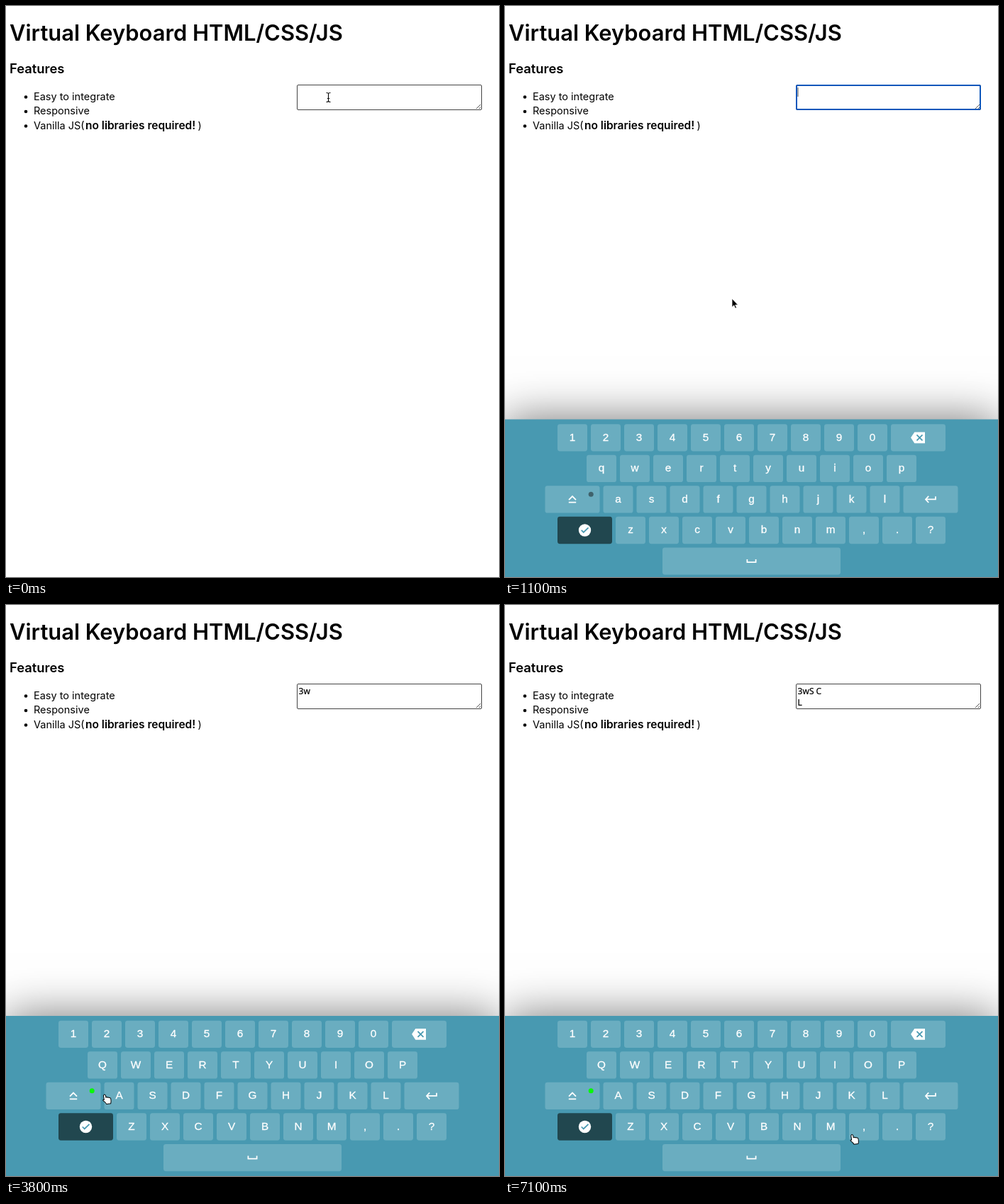
An HTML page that plays this animation: 695x806 px, repeating every 7.2 s.

```html
<!DOCTYPE html>
<html lang="en">
<head>
<meta charset="utf-8">
<title>Virtual Keyboard</title>
<style>
  html, body { margin: 0; width: 100%; height: 100%; overflow: hidden; background: #fff; }
  #stage { position: relative; width: 695px; height: 806px; overflow: hidden; }
  svg { position: absolute; left: 0; top: 0; overflow: visible; }
  #page text { font: 14.5px Inter, "Noto Sans CJK JP", sans-serif; }
  #page .h1 { font-size: 30.9px; font-weight: 600; }
  #page .h3 { font-size: 18.4px; font-weight: 600; }
  #page .b { font-size: 15.5px; font-weight: 600; }
  #page .typed { font: 500 12px "Noto Sans", sans-serif; stroke: #000; stroke-width: .2; }
  #box { fill: none; stroke: #444; }
  #ring { fill: none; stroke: #0f57bb; stroke-width: 2; }
  #kb {
    position: absolute; left: 0; top: 0; width: 695px; height: 226px;
    background: #4899b1; box-shadow: 0 0 60px rgba(0, 0, 0, .55);
  }
  #kb rect { fill: #6aadc0; }
  #kb .dark { fill: #21474f; }
  #kb text {
    font: 15.3px "Liberation Sans", Arial, sans-serif; text-anchor: middle;
    fill: #fff; stroke: #fff; stroke-width: .3;
  }
  #kb path { fill: none; stroke: #fff; stroke-width: 1.75; }
  #kb .solid { fill: #fff; stroke: none; }
  #kb .cut { stroke: #4899b1; }
</style>
</head>
<body>
<div id="stage">
  <svg id="page" width="695" height="806">
    <text class="h1" x="5" y="49">Virtual Keyboard HTML/CSS/JS</text>
    <text class="h3" x="5" y="95">Features</text>
    <circle cx="28" cy="128.5" r="2.3"/>
    <circle cx="28" cy="149" r="2.3"/>
    <circle cx="28" cy="169.5" r="2.3"/>
    <text x="39" y="132.5">Easy to integrate</text>
    <text x="39" y="153">Responsive</text>
    <text x="39" y="173.5">Vanilla JS(</text>
    <text class="b" x="112" y="173.5">no libraries required!</text>
    <text x="270.5" y="173.5">)</text>
    <rect id="box" x="410.5" y="111.5" width="260" height="35" rx="1.5"/>
    <path d="M663 145L669 139M667 145L669 143" stroke="#555"/>
    <g id="focus">
      <rect id="ring" x="411" y="112" width="259" height="34" rx="1.5"/>
      <path d="M413 115V128" stroke="#555"/>
    </g>
    <text class="typed" id="line1" x="412.6" y="126"></text>
    <text class="typed" id="line2" x="412.6" y="141.5"></text>
  </svg>
  <div id="kb"><svg id="keys" width="695" height="226"></svg></div>
  <svg width="695" height="806">
    <g id="cursor">
      <path id="beam" d="M-3-6.5Q0-6.5 0-5V5Q0 6.5-3 6.5M3-6.5Q0-6.5 0-5M0 5Q0 6.5 3 6.5M-1.7 1.5H1.7"
        fill="none" stroke="#000" stroke-width="1.1"/>
      <path id="arrow" d="M0 0V12.2L2.8 9.6 4.6 13.8 6.5 13 4.7 9H8.5Z" stroke="#fff" stroke-width=".8"/>
      <path id="hand" transform="rotate(-8) translate(-3.5 0)" fill="#fff" stroke="#000" stroke-linejoin="round"
        d="M2 8V2Q3.500 -1 5 2V5Q7 4 7.200 5.500Q9 5 9.500 6Q11.500 6 11.500 7.500V10Q11.500 12 10.500 14.500H4.500Q4 12.500 .5 9Q0 7 2 8Z"/>
    </g>
  </svg>
</div>
<script>
const LOOP = 7200, STEP = 100, KB_TOP = 580, STAGE_H = 806, SLIDE_AT = 735, SLIDE_MS = 400;
const $ = id => document.getElementById(id);

const ROWS = [
  ['1234567890', 'back'],
  ['qwertyuiop'],
  ['caps', 'asdfghjkl', 'enter'],
  ['done', 'zxcvbnm,.?'],
  ['space']
];
// Icons drawn around (0, 0): class, path
const ICONS = {
  back: [['solid', 'M-10.4 0L-5.2-7.8H9.5V7.800H-5.2Z'], ['cut', 'M-2 -4L6 4M6-4L-2 4']],
  caps: [['', 'M-5 .6L0-4.4L5 .6M-5.2 4.300H5.2']],
  enter: [['', 'M7-4.300V0H-6M-2.800-4.600L-7 0L-2.800 4.600']],
  done: [['solid', 'M-8.700 0A8.700 8.700 0 1 1 8.700 0A8.700 8.700 0 1 1-8.700 0'], ['cut', 'M-4.800 0L-1.800 3L5-3.600']],
  space: [['', 'M-6.100-2.600V1.700H6.100V-2.600']]
};

// Pointer path: time, x, y, and whether it clicks there
const ROUTE = [
  [0, 454.5, 129], [200, 454.5, 125], [800, 454.5, 125, true], [900, 454.5, 125], [1100, 320, 413],
  [2000, 188, 605, true], [2600, 183, 649, true], [3000, 155, 680], [3500, 95, 690, true],
  [4200, 206, 691, true], [4700, 261, 766], [5000, 455, 777, true], [5600, 272, 730, true],
  [6000, 673, 689], [6500, 612, 691, true], [6800, 537, 691, true], [7100, 489, 747]
];

function svg(tag, attrs, text = '') {
  const el = document.createElementNS('http://www.w3.org/2000/svg', tag);
  for (const k in attrs) el.setAttribute(k, attrs[k]);
  el.textContent = text;
  $('keys').append(el);
  return el;
}

const GAP = 5, KEY_H = 38.3, keys = [], letters = [];
const widthOf = name => name === 'space' ? 251 : ICONS[name] ? 77 : 42;

ROWS.forEach((parts, r) => {
  const row = parts.flatMap(p => ICONS[p] ? [p] : [...p]);
  const total = row.reduce((sum, name) => sum + widthOf(name) + GAP, -GAP);
  const y = 6.7 + r * 43.55;
  let x = (695 - total) / 2;
  for (const name of row) {
    const w = widthOf(name), mid = x + w / 2;
    svg('rect', { x, y, width: w, height: KEY_H, rx: 3.4, class: name === 'done' ? 'dark' : '' });
    if (ICONS[name]) {
      for (const [cls, d] of ICONS[name]) svg('path', { d, class: cls, transform: `translate(${mid} ${y + KEY_H / 2})` });
    } else {
      letters.push([svg('text', { x: mid, y: y + 23.6 }, name), name]);
    }
    keys.push({ name, x, y, w });
    x += w + GAP;
  }
});
const lamp = svg('circle', { cx: 121.2, cy: 105.8, r: 3.5 });

const keyAt = (x, y, top) => keys.find(k =>
  x >= k.x && x <= k.x + k.w && y - top >= k.y && y - top <= k.y + KEY_H);

function pointerAt(t) {
  const i = ROUTE.findIndex(p => p[0] > t);
  if (i < 0) return ROUTE[ROUTE.length - 1].slice(1);
  const [t0, x0, y0] = ROUTE[i - 1], [t1, x1, y1] = ROUTE[i];
  let k = (t - t0) / (t1 - t0);
  k *= k * (3 - 2 * k);
  return [x0 + (x1 - x0) * k, y0 + (y1 - y0) * k];
}

// Replays every click up to time t
function stateAt(t) {
  let text = '', caps = false, focus = false;
  for (const [at, x, y, click] of ROUTE) {
    if (!click || at > t) continue;
    const key = keyAt(x, y, KB_TOP);
    focus = !key;
    if (!key) continue;
    if (key.name === 'caps') caps = !caps;
    else if (key.name === 'enter') text += '\n';
    else if (key.name === 'space') text += ' ';
    else text += caps ? key.name.toUpperCase() : key.name;
  }
  return { text, caps, focus };
}

// CSS "ease" curve, solved by bisection
function ease(x) {
  if (x <= 0) return 0;
  if (x >= 1) return 1;
  let lo = 0, hi = 1, s;
  for (let i = 0; i < 24; i++) {
    s = (lo + hi) / 2;
    if (.75 * s * (1 - s) + s ** 3 < x) lo = s; else hi = s;
  }
  return .3 * s * (1 - s) ** 2 + 3 * s * s * (1 - s) + s ** 3;
}

function render(t) {
  const { text, caps, focus } = stateAt(t);
  const top = KB_TOP + STAGE_H * (1 - ease((t - SLIDE_AT) / SLIDE_MS));
  $('kb').style.transform = `translateY(${top}px)`;

  $('focus').style.display = focus ? '' : 'none';
  const [first, second = ''] = text.split('\n');
  $('line1').textContent = first;
  $('line2').textContent = second;

  for (const [el, name] of letters) el.textContent = caps ? name.toUpperCase() : name;
  lamp.setAttribute('fill', caps ? '#08f808' : '#3f626c');

  const [x, y] = pointerAt(t);
  const overBox = x > 410 && x < 671 && y > 111 && y < 147;
  const shape = overBox ? 'beam' : keyAt(x, y, top) ? 'hand' : 'arrow';
  for (const id of ['beam', 'arrow', 'hand']) $(id).style.display = id === shape ? '' : 'none';
  $('cursor').setAttribute('transform', `translate(${x} ${y})`);
}

const start = performance.now();
function tick() {
  const t = (performance.now() - start) % LOOP;
  render(Math.floor(t / STEP) * STEP);
  requestAnimationFrame(tick);
}
tick();
</script>
</body>
</html>
```
